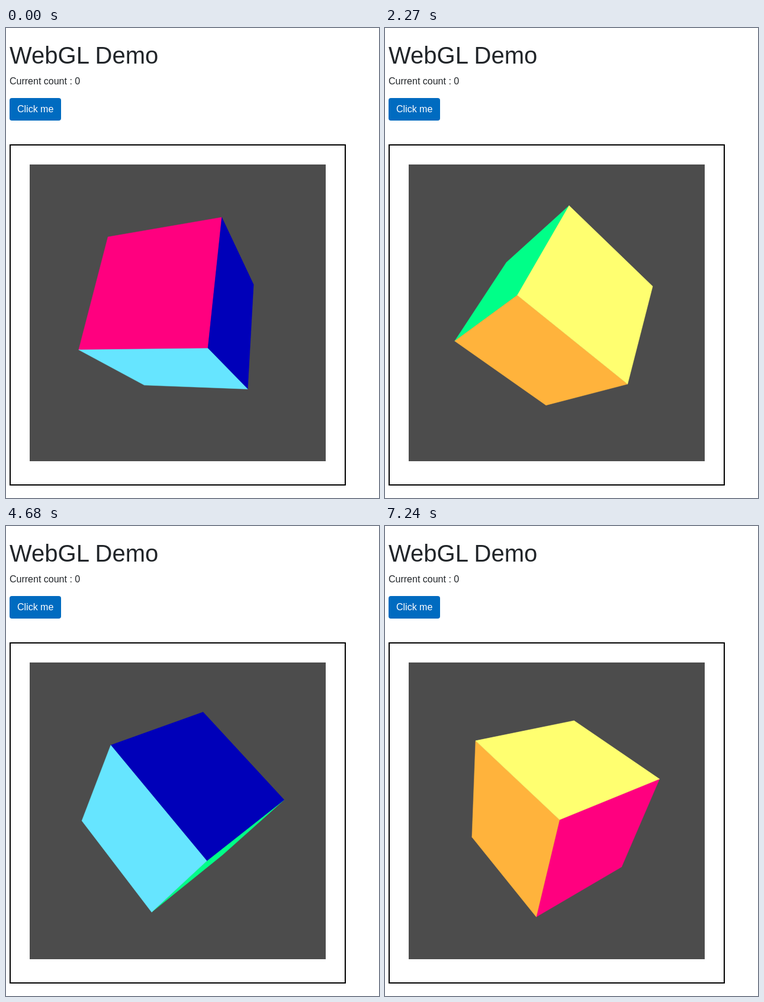
An HTML page with a canvas for the animation above (7.27 s loop, 630 px wide and 792 px high).

```html
<!DOCTYPE html>
<html lang="en">
<head>
<meta charset="utf-8">
<title>WebGL Demo</title>
<style>
  html, body { margin: 0; width: 100%; height: 100%; overflow: hidden; background: #fff; }
  body { position: relative; font: 16px/24px "Liberation Sans", Arial, sans-serif; color: #212529; }
  h1, p, .btn, .frame, canvas { position: absolute; margin: 0; box-sizing: border-box; white-space: nowrap; }
  h1 { left: 6px; top: 22px; font-size: 40px; line-height: 48px; font-weight: 400; }
  p { left: 6px; top: 78px; }
  .btn { left: 6px; top: 118px; width: 87px; height: 38px; padding: 7px 13px; border-radius: 4px; background: #006bc0; color: #fff; }
  .frame { left: 6px; top: 196px; width: 568px; height: 575px; border: 2px solid #000; }
  canvas { left: 40px; top: 230px; }
</style>
</head>
<body>
<h1>WebGL Demo</h1>
<p>Current count : 0</p>
<div class="btn">Click me</div>
<div class="frame"></div>
<canvas id="view" width="500" height="500"></canvas>
<script>
const SIZE = 500, LOOP = 7270, DISTANCE = 6;
const FOCAL = SIZE / 2 / Math.tan(Math.PI / 8); // 45 degree field of view
const AXIS = [1, 1, 0.1].map(v => v / Math.hypot(1, 1, 0.1));

// time in ms, angle in degrees, number of steps to the next key
const KEYS = [
  [0, -35.7, 50], [1550, 64, 45], [2950, 151.5, 33], [3970, 215.7, 47],
  [5450, 306.85, 24], [6200, 352.2, 33], [7240, 418.1, 1]
];

// coordinate index, sign, colour
const FACES = [
  [2, 1, '#ff007f'], [2, -1, '#00ff88'],
  [0, 1, '#0000b9'], [0, -1, '#ffb33c'],
  [1, 1, '#ffff70'], [1, -1, '#66e5ff']
];
const CORNERS = [[-1, -1], [1, -1], [1, 1], [-1, 1]];

const ctx = document.getElementById('view').getContext('2d');
ctx.lineWidth = 0.5;
ctx.lineJoin = 'round';

function angleAt(t) {
  const last = KEYS.length - 1;
  let i = 0;
  while (i < last && t + 1 >= KEYS[i + 1][0]) i++;
  const [t0, a0, steps] = KEYS[i];
  if (i === last) return a0;
  const [t1, a1] = KEYS[i + 1];
  const step = Math.floor((t + 1 - t0) / (t1 - t0) * steps);
  return a0 + (a1 - a0) * step / steps;
}

const dot = (a, b) => a[0] * b[0] + a[1] * b[1] + a[2] * b[2];
const cross = (a, b) => [
  a[1] * b[2] - a[2] * b[1],
  a[2] * b[0] - a[0] * b[2],
  a[0] * b[1] - a[1] * b[0]
];

function rotate(v, angle) {
  const c = Math.cos(angle), s = Math.sin(angle);
  const side = cross(AXIS, v), along = dot(AXIS, v) * (1 - c);
  return v.map((n, i) => n * c + side[i] * s + AXIS[i] * along);
}

function project([x, y, z]) {
  const k = FOCAL / (DISTANCE - z);
  return [SIZE / 2 + x * k, SIZE / 2 - y * k];
}

function drawFace([dim, sign, colour], angle) {
  const normal = [0, 0, 0];
  normal[dim] = sign;
  // a face is seen when the eye lies in front of its plane
  if (rotate(normal, angle)[2] * DISTANCE <= 1) return;
  ctx.beginPath();
  for (const [a, b] of CORNERS) {
    const v = normal.slice();
    v[(dim + 1) % 3] = a;
    v[(dim + 2) % 3] = b;
    ctx.lineTo(...project(rotate(v, angle)));
  }
  ctx.closePath();
  ctx.fillStyle = ctx.strokeStyle = colour;
  ctx.fill();
  ctx.stroke();
}

function draw(t) {
  const angle = angleAt(t) * Math.PI / 180;
  ctx.fillStyle = '#4c4c4c';
  ctx.fillRect(0, 0, SIZE, SIZE);
  FACES.forEach(face => drawFace(face, angle));
}

const start = performance.now();
function tick() {
  draw((performance.now() - start) % LOOP);
  requestAnimationFrame(tick);
}
tick();
</script>
</body>
</html>
```
